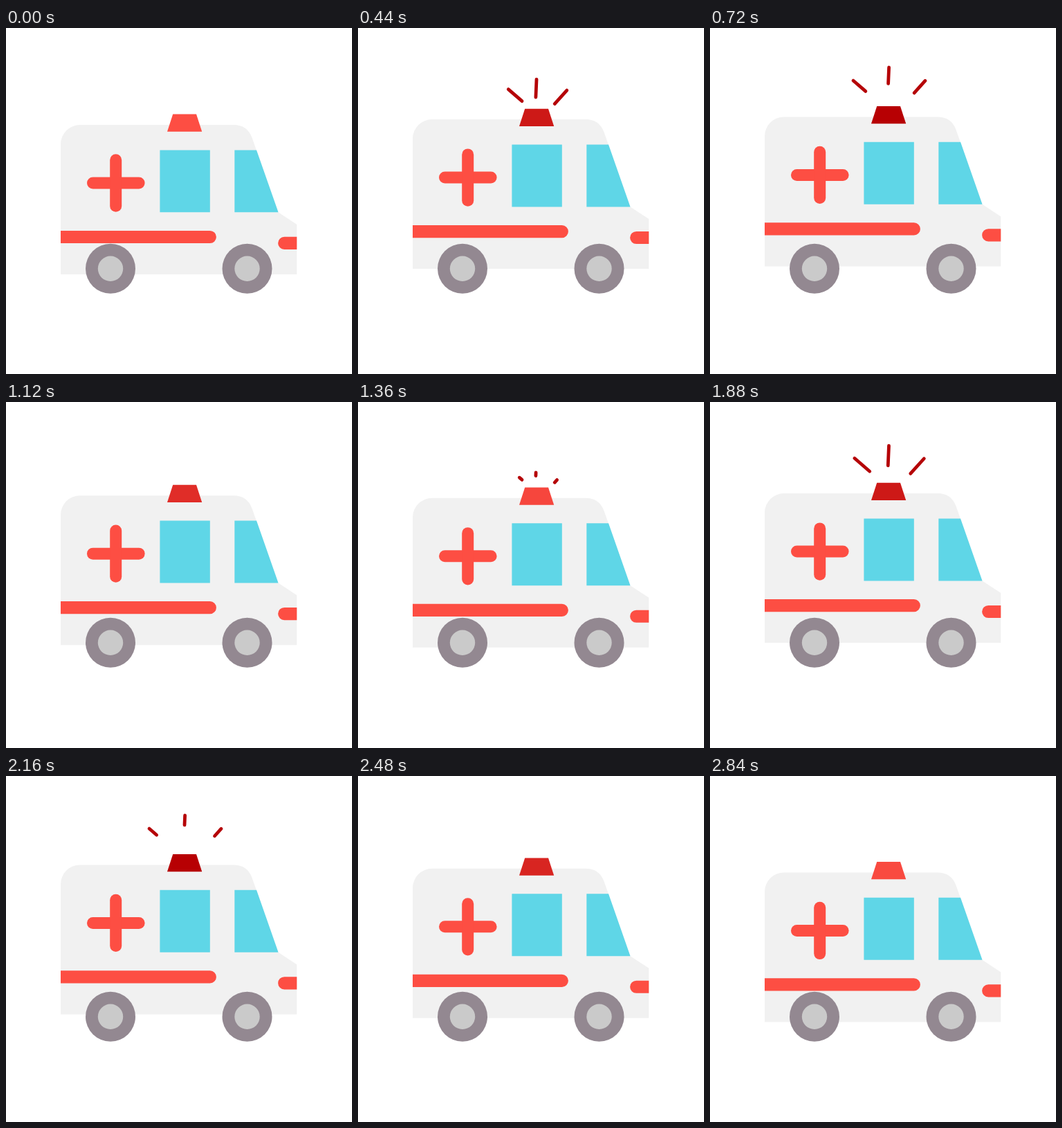
An HTML page for the animation above (2880 ms loop, 500x500 px).

```html
<!DOCTYPE html>
<html lang="en">
<head>
<meta charset="utf-8">
<title>Ambulance</title>
<style>
  html, body { margin: 0; width: 100%; height: 100%; overflow: hidden; background: #fff; }
  svg { display: block; width: 100%; height: 100%; }
  .red { fill: #fd4e43; }
  .glass { fill: #5fd6e7; }
  #rays { stroke: #b50206; stroke-width: 4.8; stroke-linecap: round; }
</style>
</head>
<body>
<svg viewBox="0 0 500 500">
  <g id="van">
    <path fill="#f1f1f1" d="M79 356V168A28 28 0 0 1 107 140H329Q348.500 140 355.500 158.500L393.500 266.300L420.300 284V356Z"/>
    <path class="glass" d="M222.400 176.400H294.800V266.300H222.400ZM330.300 176.400H362L393.500 266.300H330.300Z"/>
    <path class="red" d="M79 292.900H294.800a9.100 9.100 0 0 1 0 18.200H79ZM420.300 301.800H402.200a9.100 9.100 0 0 0 0 18.200H420.300Z"/>
    <rect class="red" x="117" y="215.500" width="83.600" height="17" rx="8.500"/>
    <rect class="red" x="150.200" y="182.300" width="17" height="83.400" rx="8.500"/>
    <path id="lamp" d="M241.200 124.600H275L283.200 149.800H233Z"/>
    <g id="rays"></g>
  </g>
  <g fill="#938891">
    <circle cx="151" cy="347.800" r="36"/>
    <circle cx="348.500" cy="347.800" r="36"/>
  </g>
  <g fill="#cacaca">
    <circle cx="151" cy="347.800" r="18.200"/>
    <circle cx="348.500" cy="347.800" r="18.200"/>
  </g>
</svg>
<script>
const LOOP = 2880, STEP = 40, HALF = 720, LIFT = 11.6, SWEEP = 640;
const LAMP_REST = [253, 78, 67], LAMP_LIT = [183, 0, 3];

// Each ray runs from its inner end to its outer end.
const RAYS = [
  [237, 113.6, 207, 87.6],
  [256.9, 107.9, 258.6, 68.6],
  [284.2, 117.5, 311, 87.8]
];
const FLASHES = [{ grow: 20, fade: 460 }, { grow: 1280, fade: 1747 }];

const van = document.getElementById('van');
const lamp = document.getElementById('lamp');
const rays = document.getElementById('rays');
const lines = RAYS.map(() => rays.appendChild(
  document.createElementNS('http://www.w3.org/2000/svg', 'line')));

const clamp = v => Math.min(1, Math.max(0, v));
const mix = (a, b, p) => a + (b - a) * p;
const easeOut = (p, k) => p + k * p * (1 - p);

function bounce(t) {
  const p = t % (2 * HALF) / HALF;
  return p < 1 ? easeOut(p, 0.3) : 1 - easeOut(p - 1, 0.1);
}

function draw(t) {
  const s = bounce(t);
  van.setAttribute('transform', `translate(0 ${-LIFT * s})`);
  lamp.setAttribute('fill', `rgb(${LAMP_REST.map((c, i) => Math.round(mix(c, LAMP_LIT[i], s)))})`);

  const flash = FLASHES[t < 2 * HALF - 200 ? 0 : 1];
  const head = clamp((t - flash.grow) / SWEEP);
  const tail = clamp((t - flash.fade) / SWEEP);
  rays.style.display = head > tail ? '' : 'none';
  lines.forEach((line, i) => {
    const [x1, y1, x2, y2] = RAYS[i];
    line.setAttribute('x1', mix(x1, x2, tail));
    line.setAttribute('y1', mix(y1, y2, tail));
    line.setAttribute('x2', mix(x1, x2, head));
    line.setAttribute('y2', mix(y1, y2, head));
  });
}

const start = performance.now();
function tick() {
  const t = (performance.now() - start) % LOOP;
  draw(Math.floor(t / STEP) * STEP);
  requestAnimationFrame(tick);
}
tick();
</script>
</body>
</html>
```
